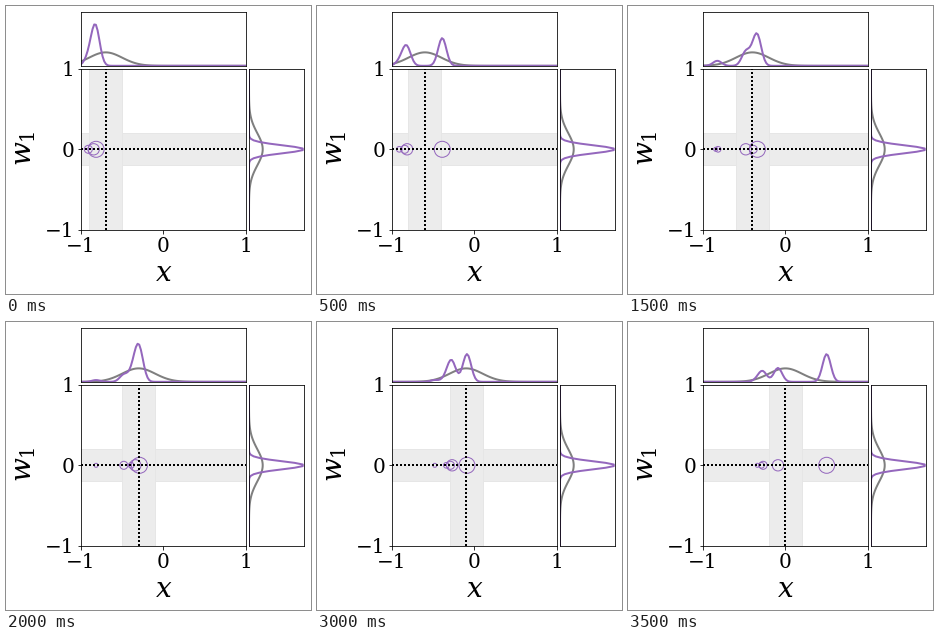
Animation, 305 px wide and 288 px high, one loop 6000 ms. Source, as a matplotlib script:

```python
import numpy as np
import matplotlib.pyplot as plt
from matplotlib.animation import FuncAnimation

W, H, DPI = 305, 288, 72
PURPLE, GRAY = "tab:purple", "tab:gray"
BAND = dict(facecolor="0.925", edgecolor="0.9", lw=1, zorder=0.5)
DOTTED = dict(color="black", ls=(0, (1, 1)), lw=2)
PRIOR_STD, SAMPLE_STD = 0.2, 0.05
STEPS, TOTAL = 8, 12
MEMORY = 5

plt.rcParams.update({
    "font.family": "DejaVu Serif",
    "mathtext.fontset": "dejavuserif",
    "font.size": 20,
})

# Sampled positions; the first four precede the opening step.
samples = np.array([-1.3, -1.2, -0.91, -0.845, -0.816, -0.39,
                    -0.48, -0.34, -0.29, -0.27, -0.09, 0.5])
weights = 0.5 ** np.arange(MEMORY)
weights /= weights.sum()
grid = np.linspace(-1, 1, 100)


def gauss(x, mean, std):
    return np.exp(-0.5 * ((x - mean) / std) ** 2) / (std * np.sqrt(2 * np.pi))


def add_axes(left, top, right, bottom):
    return fig.add_axes([left / W, 1 - bottom / H,
                         (right - left) / W, (bottom - top) / H])


fig = plt.figure(figsize=(W / DPI, H / DPI), dpi=DPI, facecolor="white")
main = add_axes(74.9, 62.8, 239.9, 223.8)
top = add_axes(74.9, 5.9, 239.9, 59.8)
side = add_axes(243, 62.8, 298, 223.8)

main.set(xlim=(-1, 1), ylim=(-1, 1), xticks=[-1, 0, 1], yticks=[-1, 0, 1])
top.set(xlim=(-1, 1), ylim=(0, 8), xticks=[], yticks=[])
side.set(xlim=(0, 8), ylim=(-1, 1), xticks=[], yticks=[])
fig.text(157.2 / W, 1 - 267.5 / H, "$x$", size=28, ha="center", va="center")
fig.text(18.8 / W, 1 - 142.6 / H, "$w_1$", size=28, rotation=90,
         ha="center", va="center")

main.axhspan(-PRIOR_STD, PRIOR_STD, **BAND)
main.axhline(0, **DOTTED)
side.plot(gauss(grid, 0, PRIOR_STD), grid, color=GRAY, lw=2)
side.plot(gauss(grid, 0, SAMPLE_STD), grid, color=PURPLE, lw=2)

mean_line = main.axvline(0, **DOTTED)
prior_curve, = top.plot([], [], color=GRAY, lw=2)
sample_curve, = top.plot([], [], color=PURPLE, lw=2)
circles = main.scatter(np.zeros(MEMORY), np.zeros(MEMORY),
                       s=(2 * 8) ** 2 * weights / weights[0],
                       facecolors="none", edgecolors=PURPLE, linewidths=1)
band = None


def update(frame):
    global band
    step = min(frame, STEPS - 1)
    mean = (step - STEPS + 1) / 10
    recent = samples[step:step + MEMORY][::-1]

    if band is not None:
        band.remove()
    band = main.axvspan(mean - PRIOR_STD, mean + PRIOR_STD, **BAND)
    mean_line.set_xdata([mean, mean])
    prior_curve.set_data(grid, gauss(grid, mean, PRIOR_STD))
    density = gauss(grid[:, None], recent, SAMPLE_STD) @ weights
    sample_curve.set_data(grid, density)
    circles.set_offsets(np.column_stack([recent, np.zeros(MEMORY)]))
    return band, mean_line, prior_curve, sample_curve, circles


anim = FuncAnimation(fig, update, frames=TOTAL, interval=500,
                     repeat=True, repeat_delay=0, blit=False)
plt.show()
```
